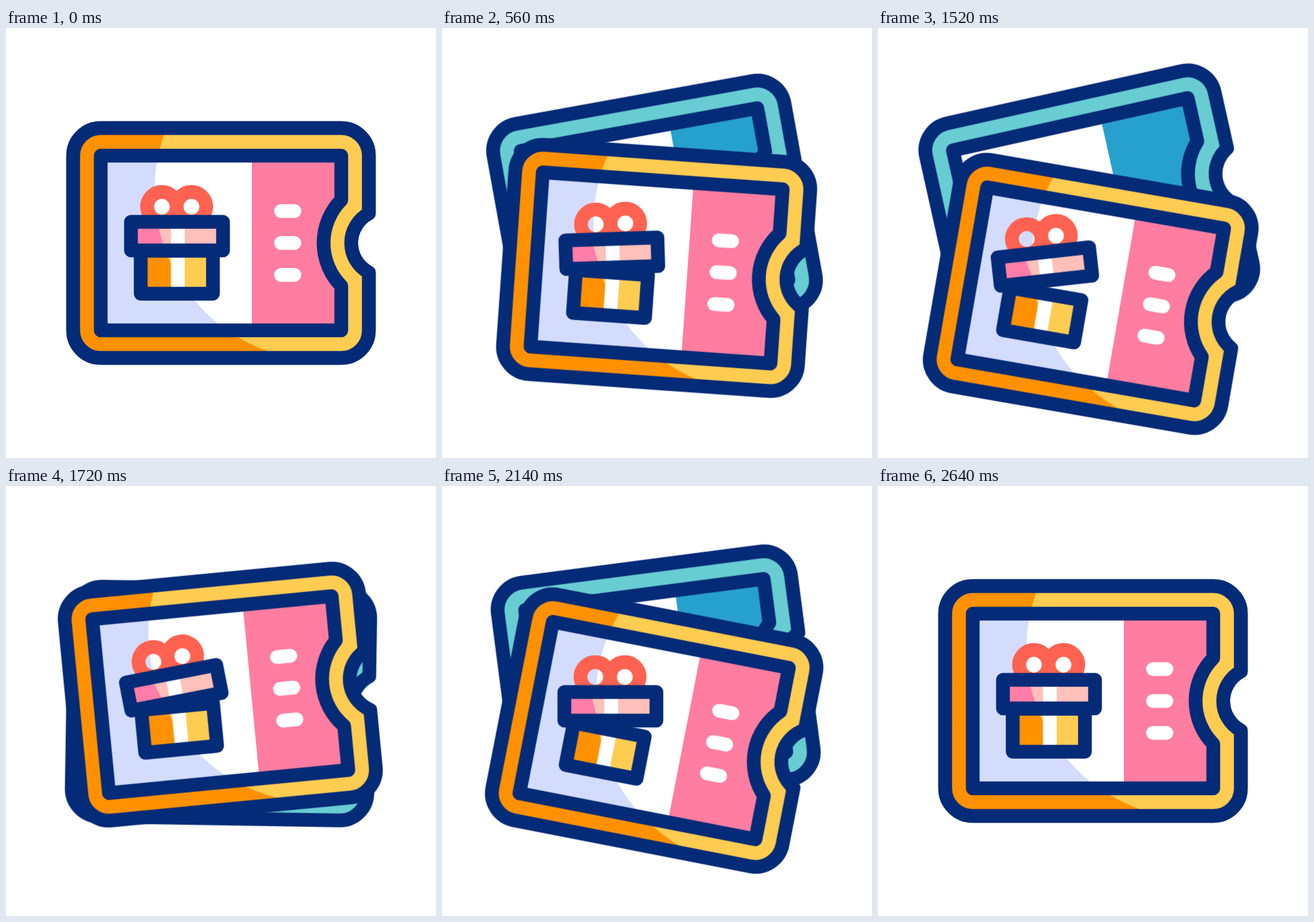
These frames come from a looping animation (640x640 px, 2.8 s). An HTML page:

```html
<!DOCTYPE html>
<html lang="en">
<head>
<meta charset="utf-8">
<title>Gift vouchers</title>
<style>
  html, body { margin: 0; width: 100%; height: 100%; overflow: hidden; background: #fff; }
  svg { display: block; width: 100%; height: 100%; }

  .line { fill: none; stroke: #042b77; stroke-width: 20.5; stroke-linejoin: round; }
  .shade { fill-rule: evenodd; }
  .dash { stroke: #fff; stroke-width: 20.5; stroke-linecap: round; }
  .bow { fill: none; stroke: #ff6250; stroke-width: 20.5; }

  .card { transform-origin: 90px 320px; }
  .lid { transform-origin: 186px 331px; }
  .card, .lid { animation: 2800ms cubic-bezier(.37, 0, .5, 1) infinite; }
  .back { animation-name: back; }
  .front { animation-name: front; }
  .lid { animation-name: lid; }

  @keyframes back {
    0% { transform: rotate(0deg); }
    14.286% { transform: rotate(-7deg); animation-timing-function: cubic-bezier(.35, 0, .25, 1); }
    29.286%, 53.571% { transform: rotate(-12.7deg); }
    68.036% { transform: rotate(8deg); }
    80.357% { transform: rotate(-10.3deg); }
    92.857%, 100% { transform: rotate(0deg); }
  }
  @keyframes front {
    0% { transform: translateY(0) rotate(0deg); }
    14.286% { transform: translateY(0) rotate(-3.9deg); animation-timing-function: cubic-bezier(.35, 0, .25, 1); }
    29.286%, 53.571% { transform: translateY(36.7px) rotate(10deg); }
    68.036% { transform: translateY(0) rotate(-13.5deg); }
    80.357% { transform: translateY(0) rotate(15.6deg); }
    92.857%, 100% { transform: translateY(0) rotate(0deg); }
  }
  @keyframes lid {
    0% { transform: rotate(0deg); }
    16.25% { transform: rotate(0deg); animation-timing-function: cubic-bezier(.35, 0, .25, 1); }
    29.286%, 53.571% { transform: rotate(-16.3deg); }
    68.036%, 69.643% { transform: rotate(0deg); }
    80.357% { transform: rotate(-14deg); }
    94.286%, 100% { transform: rotate(0deg); }
  }
</style>
</head>
<body>
<svg viewBox="0 0 640 640">
  <defs>
    <path id="outline" d="M141 149H499A41 41 0 0 1 540 190V276A50 50 0 0 0 540 364V450A41 41 0 0 1 499 491H141A41 41 0 0 1 100 450V190A41 41 0 0 1 141 149Z"/>
    <path id="panel" d="M141 190H499V256A91 91 0 0 0 499 384V450H141Z"/>
    <rect id="lidShape" x="186" y="288.5" width="137" height="42.5"/>
    <rect id="boxShape" x="200.5" y="331.5" width="107.5" height="64"/>
    <!-- the card area with a large circle cut out -->
    <path id="shade" class="shade" d="M90 130H560V510H90Z M221 242.5A253 253 0 0 1 727 242.5A253 253 0 0 1 221 242.5Z"/>
    <clipPath id="inOutline"><use href="#outline"/></clipPath>
    <clipPath id="inPanel"><use href="#panel"/></clipPath>
    <clipPath id="inLid"><use href="#lidShape"/></clipPath>
    <clipPath id="inBox"><use href="#boxShape"/></clipPath>
  </defs>

  <g class="card back">
    <use href="#outline" fill="#67cdd3"/>
    <use href="#panel" fill="#fff"/>
    <path d="M366 190H500V450H366Z" fill="#26a1ce" clip-path="url(#inPanel)"/>
    <use href="#panel" class="line"/>
    <use href="#outline" class="line"/>
  </g>

  <g class="card front">
    <use href="#outline" fill="#ffcc52"/>
    <g clip-path="url(#inOutline)"><use href="#shade" fill="#ff9100"/></g>
    <use href="#panel" fill="#fff"/>
    <g clip-path="url(#inPanel)">
      <use href="#shade" fill="#d3dcfd"/>
      <path d="M366 190H500V450H366Z" fill="#ff7da0"/>
    </g>
    <use href="#panel" class="line"/>
    <use href="#outline" class="line"/>
    <path class="dash" d="M409.3 272.5H429.3M409.3 320H429.3M409.3 367.5H429.3"/>

    <use href="#boxShape" fill="#ffcc52"/>
    <g clip-path="url(#inBox)">
      <use href="#shade" fill="#ff9100"/>
      <path d="M245.5 330H266V396H245.5Z" fill="#fff"/>
    </g>
    <use href="#boxShape" class="line"/>

    <g class="lid">
      <circle class="bow" cx="232" cy="266" r="22"/>
      <circle class="bow" cx="276" cy="266" r="22"/>
      <use href="#lidShape" fill="#ffbfba"/>
      <g clip-path="url(#inLid)">
        <use href="#shade" fill="#ff7da8"/>
        <path d="M245.5 288H266V331H245.5Z" fill="#fff"/>
      </g>
      <use href="#lidShape" class="line"/>
    </g>
  </g>
</svg>
</body>
</html>
```
